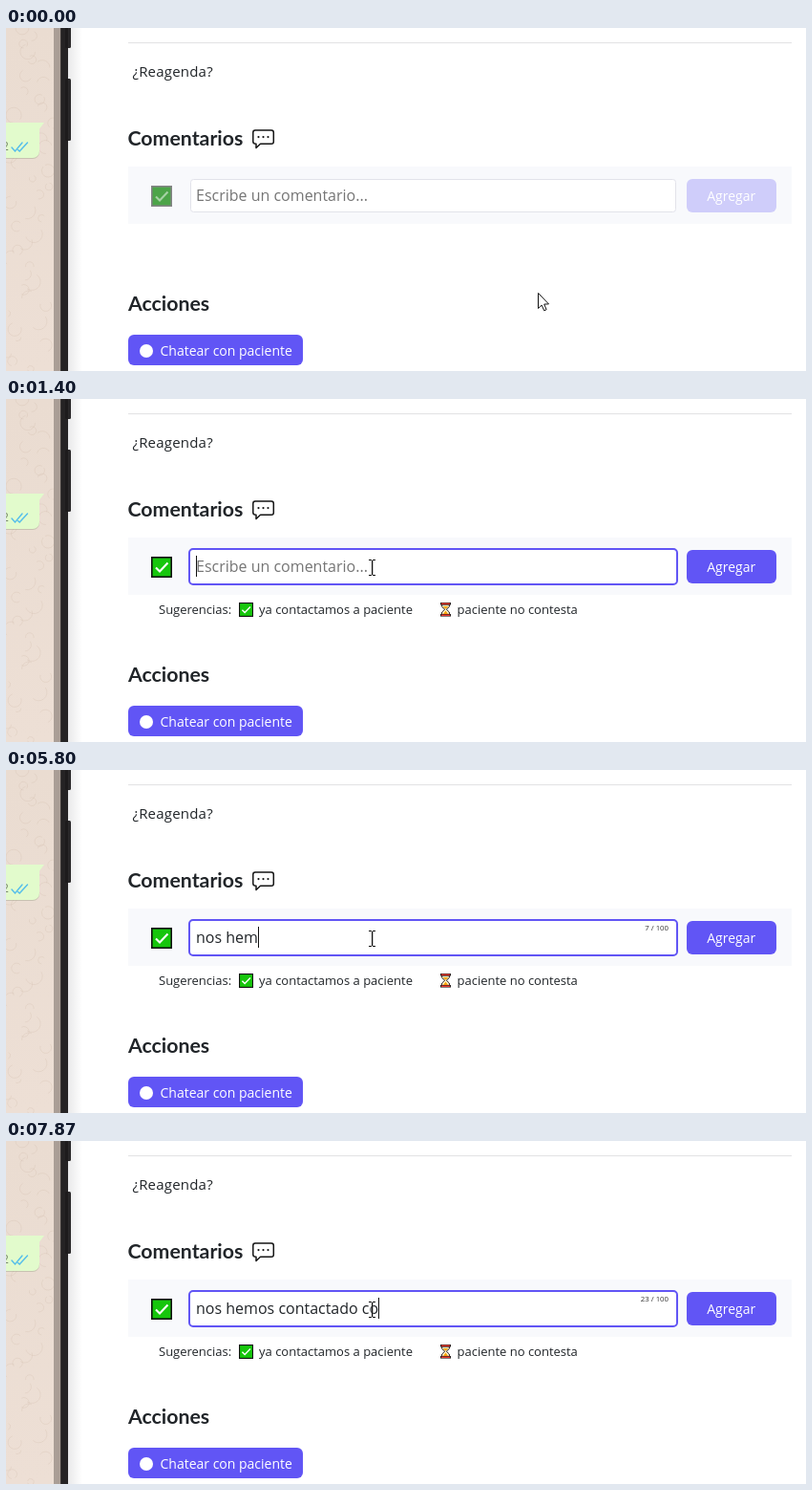
Animation of 838x359 px, one loop 8000 ms. Source, as an HTML page with a canvas:

```html
<!DOCTYPE html>
<html lang="es">
<head>
<meta charset="utf-8">
<style>
  html, body { margin: 0; width: 100%; height: 100%; overflow: hidden; background: #fff; }
  canvas { display: block; }
</style>
</head>
<body>
<canvas id="stage" width="838" height="359"></canvas>
<script>
const ctx = document.getElementById('stage').getContext('2d');
const LOOP = 8000, TICK = 1000 / 15, BLINK = 532;
const FOCUS_AT = 870;
const PURPLE = '#6155f5', INK = '#212529';
const SANS = '"Open Sans", sans-serif', HEAD = 'Lato, sans-serif';
const COMMENT = 'nos hemos contactado co';
const KEY_TIMES = [4930, 5200, 5270, 5400, 5470, 5600, 5800, 5870, 6000, 6070, 6200, 6270,
  6470, 6530, 6670, 6800, 7000, 7070, 7330, 7530, 7600, 7800, 7870];

function rect(x, y, w, h, color) {
  ctx.fillStyle = color;
  ctx.fillRect(x, y, w, h);
}

function box(x, y, w, h, r, fill, stroke, lineWidth = 1) {
  ctx.beginPath();
  ctx.roundRect(x, y, w, h, r);
  if (fill) { ctx.fillStyle = fill; ctx.fill(); }
  if (stroke) { ctx.strokeStyle = stroke; ctx.lineWidth = lineWidth; ctx.stroke(); }
}

function poly(points, { fill, stroke, width = 1, close = false }) {
  ctx.beginPath();
  points.forEach(([x, y]) => ctx.lineTo(x, y));
  if (close) ctx.closePath();
  if (fill) { ctx.fillStyle = fill; ctx.fill(); }
  if (stroke) { ctx.strokeStyle = stroke; ctx.lineWidth = width; ctx.stroke(); }
}

function text(str, x, y, font, color, align = 'left') {
  ctx.font = font;
  ctx.fillStyle = color;
  ctx.textAlign = align;
  ctx.fillText(str, x, y);
}

function withAlpha(alpha, draw) {
  ctx.save();
  ctx.globalAlpha = alpha;
  draw();
  ctx.restore();
}

function seeded(seed) {
  return () => (seed = (seed * 16807) % 2147483647) / 2147483647;
}

function drawWallpaper() {
  const shade = ctx.createLinearGradient(0, 0, 0, 359);
  shade.addColorStop(0, '#eadcd1');
  shade.addColorStop(1, '#eddfd5');
  rect(0, 0, 50, 359, shade);
  const rnd = seeded(71);
  ctx.save();
  ctx.beginPath();
  ctx.rect(0, 0, 50, 359);
  ctx.clip();
  ctx.strokeStyle = 'rgba(200,176,160,.22)';
  ctx.lineWidth = 1;
  for (let i = 0; i < 44; i++) {
    const start = rnd() * 6.28;
    ctx.beginPath();
    ctx.arc(rnd() * 50, i * 8.3, 3 + rnd() * 6, start, start + 2 + rnd() * 4);
    ctx.stroke();
  }
  ctx.restore();
}

function drawPhone() {
  drawWallpaper();
  rect(50, 0, 7, 359, '#aa9e96');
  rect(57, 0, 8, 359, '#252324');
  rect(57, 0, 1, 359, '#3a3636');
  box(62, -5, 6, 26, 1.5, '#1d1b1c');
  box(62, 53, 6, 65, 1.5, '#1d1b1c');
  const glow = ctx.createLinearGradient(65, 0, 80, 0);
  glow.addColorStop(0, 'rgba(120,120,125,.16)');
  glow.addColorStop(1, 'rgba(120,120,125,0)');
  rect(65, 0, 15, 359, glow);

  box(-10, 101, 45, 36, 7, 'rgba(120,130,100,.3)');
  box(-10, 99, 45, 37, [0, 0, 7, 0], '#e2fbcc');
  poly([[34, 99], [40, 99], [34, 107]], { fill: '#e2fbcc', close: true });
  text('2', -4, 128, '12px ' + SANS, '#76836c');
  ctx.lineCap = 'round';
  poly([[6, 125], [9.5, 129], [17, 120]], { stroke: '#53bdeb', width: 1.4 });
  poly([[12.5, 127.5], [14.2, 129], [22.5, 120]], { stroke: '#53bdeb', width: 1.4 });
  ctx.lineCap = 'butt';
}

function drawSpeechBubble() {
  ctx.lineJoin = 'round';
  ctx.beginPath();
  ctx.moveTo(261, 107);
  ctx.lineTo(278, 107);
  ctx.quadraticCurveTo(280.3, 107, 280.3, 109.5);
  ctx.lineTo(280.3, 119);
  ctx.quadraticCurveTo(280.3, 121.3, 278, 121.3);
  ctx.lineTo(266.5, 121.3);
  ctx.lineTo(262, 125.5);
  ctx.lineTo(262, 121.3);
  ctx.quadraticCurveTo(258.8, 121.3, 258.8, 119);
  ctx.lineTo(258.8, 109.5);
  ctx.quadraticCurveTo(258.8, 107, 261, 107);
  ctx.closePath();
  ctx.strokeStyle = '#151515';
  ctx.lineWidth = 1.5;
  ctx.stroke();
  for (const x of [264.5, 269.5, 274.5]) box(x - 1.1, 113, 2.2, 2.2, 1.1, '#151515');
  ctx.lineJoin = 'miter';
}

function drawCheck(x, y, size) {
  const u = size / 22;
  rect(x, y, size, size, '#111');
  const edge = Math.max(1, 1.6 * u);
  rect(x + edge, y + edge, size - 2 * edge, size - 2 * edge, '#16c60c');
  poly([[5, 11.5], [9, 15.5], [17.5, 6.5]].map(([a, b]) => [x + a * u, y + b * u]),
    { stroke: '#fff', width: 2.1 * u });
}

function drawHourglass() {
  poly([[456.5, 215], [464.5, 215], [464.3, 217.5], [461.3, 220.2], [464.3, 223], [464.5, 226],
    [456.5, 226], [456.7, 223], [459.7, 220.2], [456.7, 217.5]],
    { fill: '#fff4d0', stroke: '#2a2020', width: 1, close: true });
  poly([[457.7, 217], [463.3, 217], [460.5, 219.8]], { fill: '#f7a30b', close: true });
  poly([[457.5, 225.5], [460.5, 221.5], [463.5, 225.5]], { fill: '#f7a30b', close: true });
  for (const y of [213, 225]) {
    rect(455, y, 11, 2.6, '#2a2020');
    rect(456, y + .6, 9, 1.4, '#e8382e');
  }
}

function drawPage() {
  rect(0, 0, 838, 359, '#fff');
  drawPhone();
  rect(128, 15, 695, 1, '#e2e2e4');
  ctx.letterSpacing = '0.2px';
  text('¿Reagenda?', 132.5, 51, '500 15px ' + SANS, INK);
  ctx.letterSpacing = '0px';
  text('Comentarios', 127.5, 123, '700 21.3px ' + HEAD, INK);
  drawSpeechBubble();
  rect(128, 145, 695, 60, '#f8f9fc');
  text('Acciones', 128, 296, '700 21.3px ' + HEAD, INK);
  box(128, 321, 183, 32, 6, PURPLE);
  box(140, 331, 14, 14, 7, '#fff');
  text('Chatear con paciente', 161.5, 343, '14px ' + SANS, '#fff');
}

function drawForm(t, focus) {
  withAlpha(.5 + .5 * focus, () => drawCheck(152, 165, 22));
  box(193.5, 158.5, 508, 34, 3, '#fff', '#e2e3ea');
  if (focus) withAlpha(focus, () => box(192, 157, 511, 37, 4, '#fff', PURPLE, 2));

  withAlpha(.27 + .73 * focus, () => box(713, 158, 94, 35, 6, PURPLE));
  text('Agregar', 759.7, 180.5, '14px ' + SANS, '#fff', 'center');

  const count = KEY_TIMES.filter(k => k <= t).length;
  const typed = COMMENT.slice(0, count);
  const font = '16px ' + SANS;
  if (count) {
    text(typed, 199, 181, font, INK);
    text(count + ' / 100', 694, 168, '7.8px ' + SANS, '#333', 'right');
  } else {
    text('Escribe un comentario...', 199, 181, font, '#757575');
  }

  const blinkOn = Math.floor((t - FOCUS_AT) / BLINK) % 2 === 0;
  if (t >= FOCUS_AT && (count || blinkOn)) {
    ctx.font = font;
    const x = Math.round(199 + ctx.measureText(typed).width);
    rect(x, 164, 1, 22, '#111');
  }
}

function drawSuggestions(focus) {
  if (!focus) return;
  withAlpha(focus, () => {
    const font = '13px ' + SANS;
    text('Sugerencias:', 160, 225, font, INK);
    drawCheck(244, 213, 15);
    text('ya contactamos a paciente', 265, 225, font, INK);
    drawHourglass();
    text('paciente no contesta', 472.5, 225, font, INK);
  });
}

function drawArrow(x, y) {
  const shape = [[0, 0], [0, 16], [3.7, 12.6], [6.2, 18.3], [8.6, 17.2], [6.2, 11.6], [11, 11.4]];
  poly(shape.map(([a, b]) => [x + a + .5, y + b + .5]),
    { fill: '#fff', stroke: '#111', width: 1, close: true });
}

function drawBeam(x, y) {
  const bars = [[-3, -8, 3, 1], [1, -8, 3, 1], [0, -7, 1, 15], [-3, 8, 3, 1], [1, 8, 3, 1]];
  for (const [a, b, w, h] of bars) rect(x + a - .5, y + b - .5, w + 1, h + 1, 'rgba(255,255,255,.6)');
  for (const [a, b, w, h] of bars) rect(x + a, y + b, w, h, '#111');
  rect(x + .8, y - 7, .5, 15, '#111');
}

function drawPointer(t) {
  const p = Math.min(1, Math.floor(t / TICK) / 10);
  const eased = p * p * (3 - 2 * p);
  const x = Math.round(557 + (383 - 557) * eased);
  const y = Math.round(277 + (176 - 277) * eased);
  (y < 193 ? drawBeam : drawArrow)(x, y);
}

function render(t) {
  const focus = t < FOCUS_AT ? 0 : Math.min(1, (Math.floor((t - FOCUS_AT + 5) / TICK) + 1) / 5);
  drawPage();
  drawForm(t, focus);
  drawSuggestions(focus);
  drawPointer(t);
}

function loop() {
  render(performance.now() % LOOP);
  requestAnimationFrame(loop);
}
loop();
</script>
</body>
</html>
```
